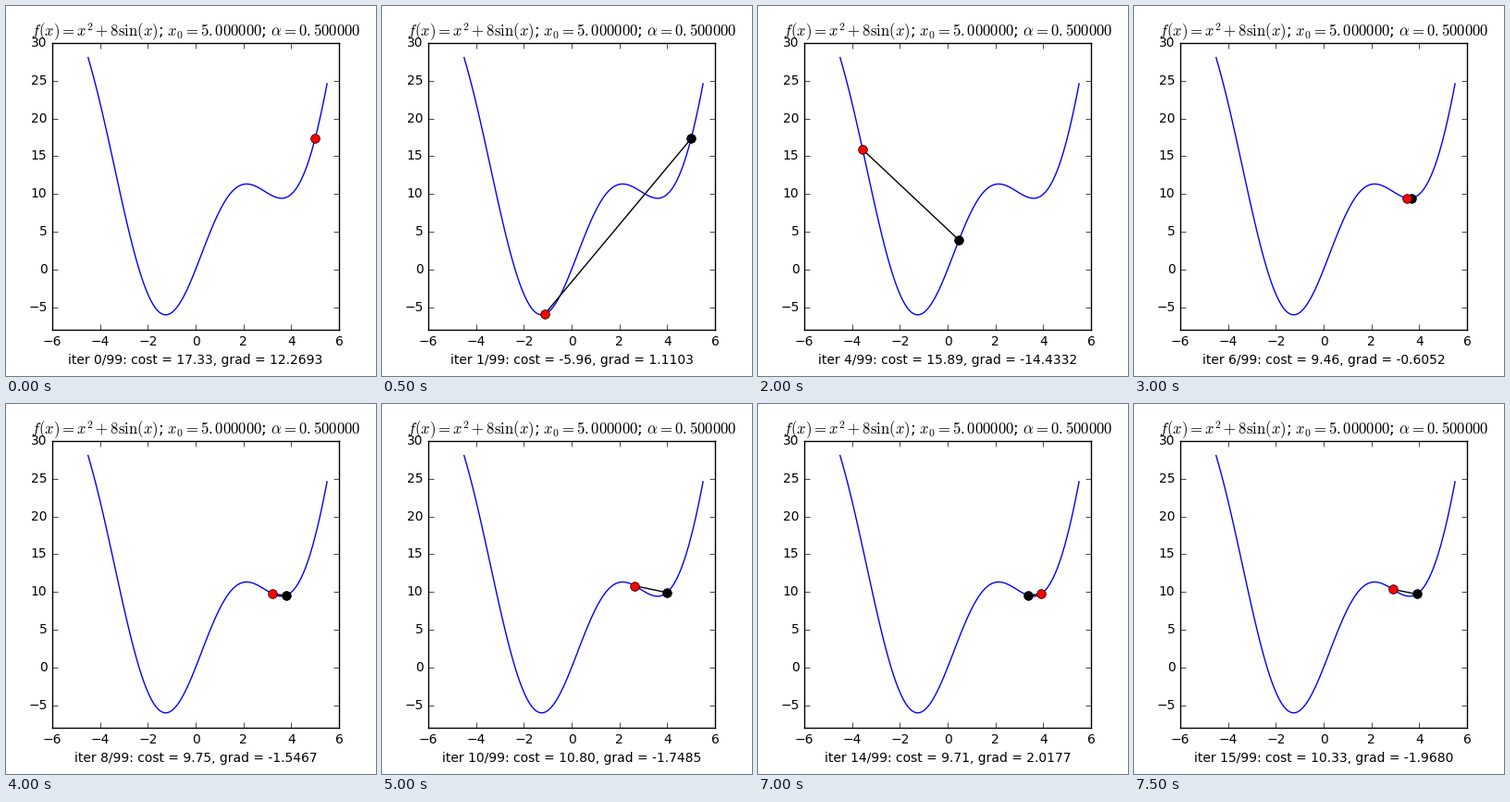
Write a matplotlib script that moves like this. It is 400 px wide and 400 px high and loops after 8 s.

```python
import numpy as np
import matplotlib.pyplot as plt
from matplotlib.animation import FuncAnimation

plt.style.use("classic")
plt.rcParams.update({
    "font.family": "DejaVu Sans",
    "font.size": 10,
    "figure.facecolor": "white",
    "savefig.dpi": "figure",
    "lines.markersize": 7,
})

X0, ALPHA, MAX_ITER = 5.0, 0.5, 99
FRAMES, INTERVAL = 16, 500


def f(x):
    return x**2 + 8 * np.sin(x)


def grad(x):
    return 2 * x + 8 * np.cos(x)


def descend(x, steps):
    path = [x]
    for _ in range(steps - 1):
        path.append(path[-1] - ALPHA * grad(path[-1]))
    return np.array(path)


def spaced(value):
    """Math text number with a punctuation space after the point."""
    return f"{value:.6f}".replace(".", "{.}")


path = descend(X0, FRAMES)

fig, ax = plt.subplots(figsize=(4, 4), dpi=100)
fig.subplots_adjust(left=0.125, right=0.9, bottom=0.125, top=0.9)

xs = np.linspace(-4.5, 5.5, 100)
ax.plot(xs, f(xs), "b-")
step_line, = ax.plot([], [], "k-")
prev_dot, = ax.plot([], [], "ko")
dot, = ax.plot([], [], "ro")

ax.set_xlim(-6, 6)
ax.set_ylim(-8, 30)
ax.set_xticks(range(-6, 7, 2))
ax.set_yticks(range(-5, 31, 5))
ax.set_title(rf"$f(x) = x^2 + 8 \sin(x)$; $x_0 = {spaced(X0)}$; "
             rf"$\alpha = {spaced(ALPHA)}$")
label = ax.set_xlabel("")


def update(i):
    x = path[i]
    prev = path[i - 1:i]
    link = path[i - 1:i + 1] if i else prev
    step_line.set_data(link, f(link))
    prev_dot.set_data(prev, f(prev))
    dot.set_data([x], [f(x)])
    label.set_text(f"iter {i}/{MAX_ITER}: cost = {f(x):.2f}, grad = {grad(x):.4f}")
    return step_line, prev_dot, dot, label


anim = FuncAnimation(fig, update, frames=FRAMES, interval=INTERVAL,
                     repeat=True, repeat_delay=0, blit=False)
plt.show()
```
